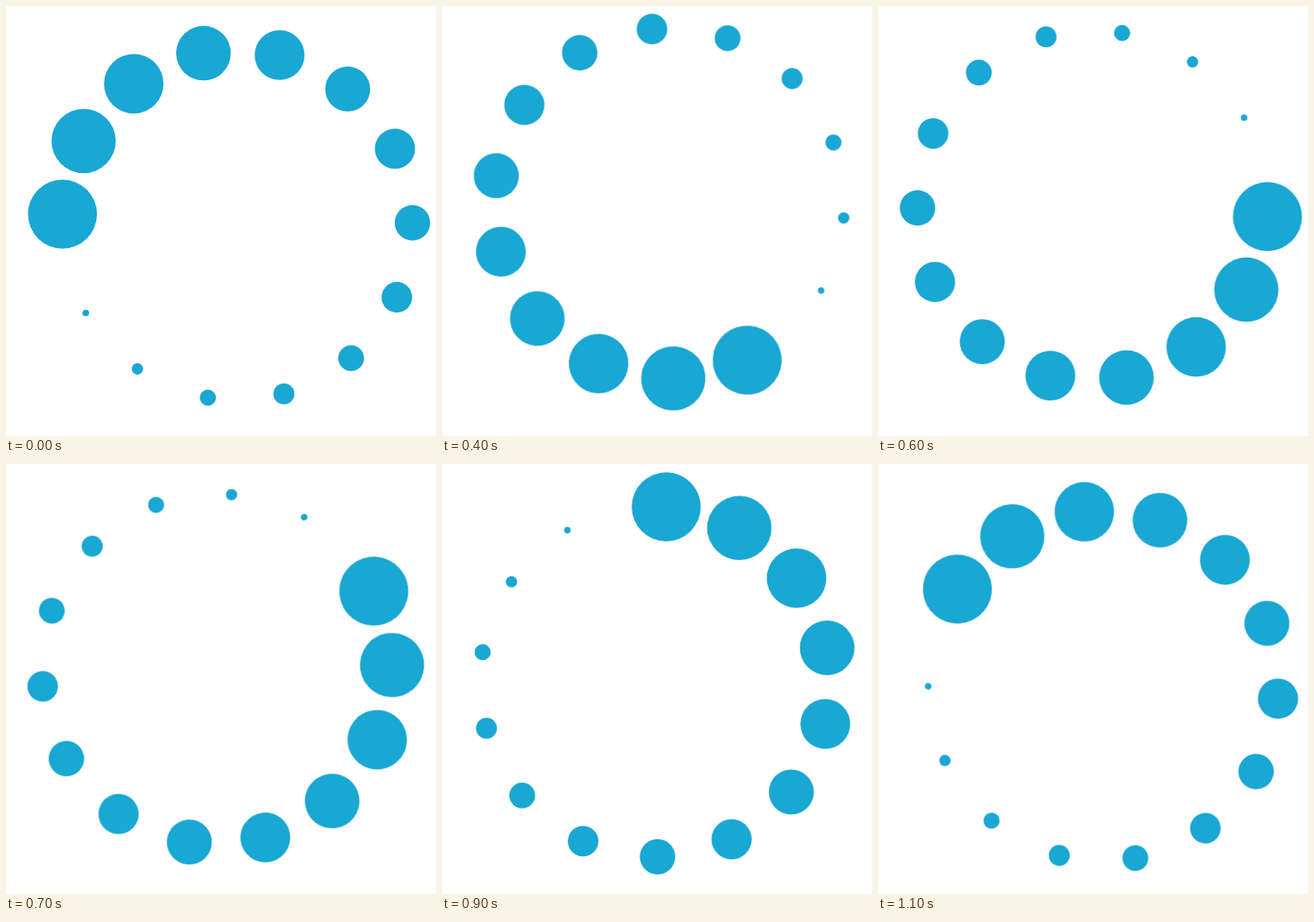
These frames come from a looping animation (533x533 px, 1.2 s). An HTML page:

```html
<!DOCTYPE html>
<html lang="en">
<head>
<meta charset="utf-8">
<title>Loading spinner</title>
<style>
  html, body { margin: 0; width: 100%; height: 100%; overflow: hidden; background: #fff; }
  svg { display: block; width: 100%; height: 100%; }
  #ring { fill: #19a7d3; transform-origin: 276.4px 259.5px; }
</style>
</head>
<body>
<svg viewBox="0 0 533 533"><g id="ring"></g></svg>
<script>
  const ring = document.getElementById('ring');
  const DOTS = 14, STEP = 25.1, START = 183.57;
  // The dots' own circle is slightly off the pivot, so the ring wobbles as it turns.
  const CX = 286.7, CY = 271.5, RADIUS = 217.1;

  for (let i = 0; i < DOTS; i++) {
    const angle = (START + i * STEP) * Math.PI / 180;
    const dot = document.createElementNS('http://www.w3.org/2000/svg', 'circle');
    dot.setAttribute('cx', CX + RADIUS * Math.cos(angle));
    dot.setAttribute('cy', CY + RADIUS * Math.sin(angle));
    dot.setAttribute('r', 42.8 - 2.98 * i);
    ring.append(dot);
  }

  ring.animate(
    [{ transform: 'rotate(0deg)' }, { transform: 'rotate(-360deg)' }],
    { duration: 1200, iterations: Infinity, easing: 'steps(12, end)' }
  );
</script>
</body>
</html>
```
